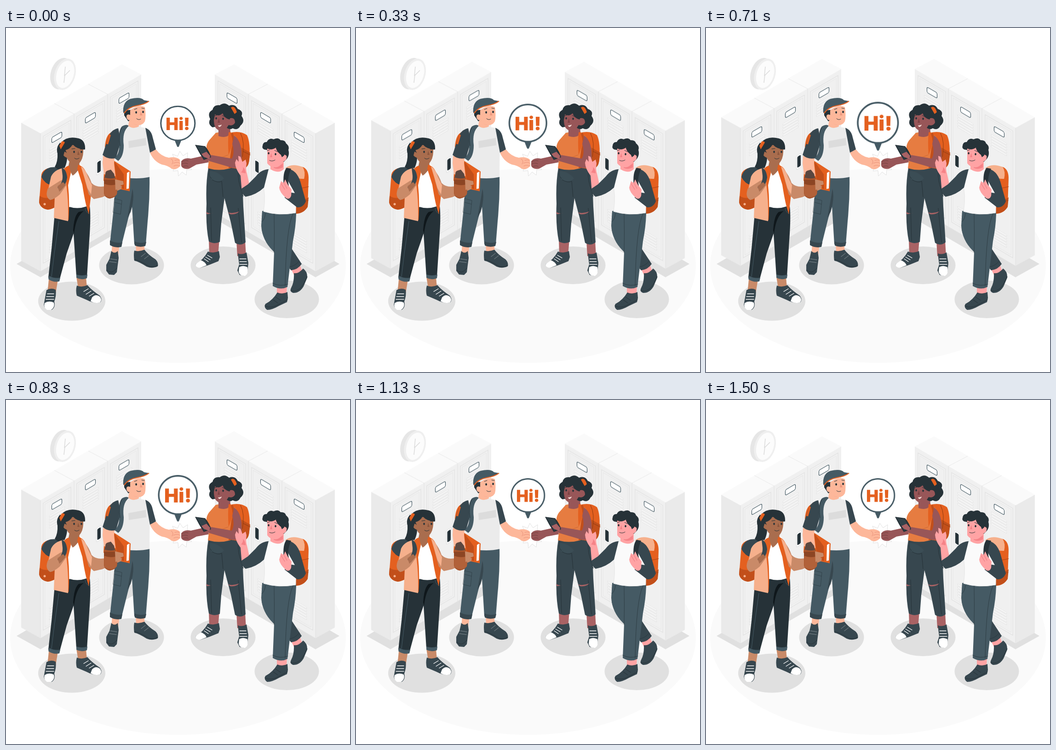
Animation of 748 by 748 pixels, one loop 1540 ms. Source, as an HTML page:

```html
<!DOCTYPE html>
<html lang="en">
<head>
<meta charset="utf-8">
<title>Hi!</title>
<style>
html, body { margin: 0; width: 100%; height: 100%; overflow: hidden; background: #fff; }
svg { display: block; width: 100vw; height: 100vh; }
.ink { fill: #263238; } .slate { fill: #455a64; } .deep { fill: #37474f; }
.orange { fill: #e4601f; } .rust { fill: #c24f1a; } .peach { fill: #f6b08c; }
.white { fill: #fff; } .shade { fill: #e0e0e0; }
.tan { fill: #a96d4e; } .tan2 { fill: #c98a68; } .fair { fill: #fdb79a; } .fair2 { fill: #ee987e; }
.brown { fill: #985658; } .brown2 { fill: #a96264; } .pink { fill: #ffa3a4; } .pink2 { fill: #f58388; }
.line { fill: none; stroke: #263238; stroke-width: 1; stroke-linecap: round; stroke-linejoin: round; }
.lace { fill: none; stroke: #fff; stroke-width: 1.3; stroke-linecap: round; }
.edge { fill: none; stroke: #e1e1e1; }
.lift { animation: lift 1540ms -15ms infinite; }
.bubble { transform-origin: 374px 214px; animation: beat 1540ms -15ms infinite; }
/* 37 poses per loop */
@keyframes lift {
  0% { transform: none; animation-timing-function: steps(18); }
  48.6486% { transform: translateY(-12.6px); animation-timing-function: steps(18); }
  97.2973%, 100% { transform: none; animation-timing-function: steps(1); }
}
@keyframes beat {
  0% { transform: scale(1.03); animation-timing-function: steps(3); }
  8.1081% { transform: scale(1.25); animation-timing-function: steps(1); }
  10.8108% { transform: scale(1.284); animation-timing-function: steps(7); }
  29.7297% { transform: scale(1); animation-timing-function: steps(1); }
  40.5405% { transform: scale(1.05); animation-timing-function: steps(3); }
  48.6486% { transform: scale(1.3); animation-timing-function: steps(4); }
  59.4595% { transform: scale(1.015); animation-timing-function: steps(1); }
  62.1622%, 100% { transform: scale(1); animation-timing-function: steps(1); }
}
</style>
</head>
<body>
<svg viewBox="0 0 748 748">
<defs>
  <g id="vent" fill="#fafafa" stroke="#e0e0e0" stroke-width=".8">
    <rect x="19" width="34" height="3.2" rx="1.5"/><rect x="19" y="6" width="34" height="3.2" rx="1.5"/>
    <rect x="19" y="12" width="34" height="3.2" rx="1.5"/><rect x="19" y="18" width="34" height="3.2" rx="1.5"/>
    <rect x="19" y="24" width="34" height="3.2" rx="1.5"/>
  </g>
  <g id="locker">
    <path class="edge" d="M0 0V300"/>
    <rect x="6" y="10" width="60" height="276" fill="#f2f2f2" stroke="#e3e3e3" stroke-width="1.5"/>
    <rect x="9.500" y="14" width="53" height="268" fill="#f0f0f0" stroke="#e6e6e6"/>
    <rect x="24.500" y="23.500" width="22" height="12" rx="3" fill="#fff" stroke="#455a64" stroke-width="1.200"/>
    <use href="#vent" y="45"/><use href="#vent" y="244"/>
    <rect x="48.500" y="132" width="11" height="30" rx="2" fill="#fff" stroke="#dedede"/>
    <rect x="50.500" y="135" width="7.500" height="24" rx="2" fill="#263238"/>
  </g>
  <g id="bank">
    <path fill="#fafafa" d="M33 206L252 79 294 101 75 229Z"/>
    <path fill="#eaeaea" d="M33 206L75 229V529L33 506Z"/>
    <path fill="#f0f0f0" d="M75 229L294 101V401L75 529Z"/>
    <path class="edge" d="M105 164L148 187M179 122L221 144" stroke-width=".7"/>
    <g transform="matrix(1 -.584 0 1 75 229)">
      <use href="#locker"/><use href="#locker" x="73"/><use href="#locker" x="146"/>
    </g>
  </g>
  <path id="pad" class="shade" d="M23 513L75 542 306 408 254 379Z"/>
</defs>

<ellipse cx="374" cy="517" rx="365" ry="211" fill="#fafafa"/>

<g transform="rotate(17 126 101)">
  <ellipse cx="120" cy="101" rx="23" ry="35" fill="#e6e6e6"/>
  <ellipse cx="128" cy="100" rx="22.500" ry="35" fill="#efefef"/>
  <ellipse cx="128.500" cy="100" rx="18.500" ry="30.500" fill="#fcfcfc"/>
</g>
<path d="M127 104L129 84M127 104L139 92M128 101L126 119" fill="none" stroke="#dadada" stroke-width="1.500"/>

<use href="#pad"/><use href="#pad" transform="matrix(-1 0 0 1 748 0)"/>
<g class="lift"><use href="#bank"/><use href="#bank" transform="matrix(-1 0 0 1 748 0)"/></g>

<g class="shade">
  <ellipse cx="143" cy="594" rx="73" ry="42.500"/><ellipse cx="273" cy="516" rx="70.500" ry="41.500"/>
  <ellipse cx="472" cy="516" rx="70.500" ry="41"/><ellipse cx="610.500" cy="590" rx="70" ry="41"/>
</g>

<path d="M366 285L362 274 373 279 378 268 385 278 395 271 394 284 405 287 397 297 404 308 393 308 392 320 383 313 375 322 374 310 363 311 369 300 360 294Z" fill="#fff" stroke="#e0e0e0"/>

<!-- boy in cap -->
<g>
  <path class="fair" d="M231 470H247L244 493H229ZM282 468H300L302 488 283 489Z"/>
  <path class="deep" d="M229 485Q236 492 243 485L245 500 243 515 241 531 235 537 224 536 218 528 218 515 225 502ZM279 484Q289 487 301 482 309 493 325 503 332 510 330 518 319 524 306 519 289 508 279 506 277 493 279 484Z"/>
  <path class="line" d="M219 526Q229 538 241 522M279 503Q292 506 309 517 319 522 330 516"/>
  <path class="lace" stroke-opacity=".25" d="M227 502L241 504M225 508L240 510M294 497L303 490M301 502L310 495"/>
  <path class="slate" d="M238 321H312Q313 370 308 420L304 470Q292 477 279 470L274 388 266 413 251 473Q238 479 226 468L235 385Z"/>
  <path class="deep" d="M226 462Q240 469 253 466L251 476Q237 479 226 472ZM279 464Q292 470 305 465L303 474Q291 478 280 473ZM275 350Q280 370 271 400L264 412Q272 370 275 350Z"/>
  <path class="line" stroke-opacity=".55" d="M236 371L252 375 249 405 233 401ZM236 379L251 383"/>
  <path class="orange" d="M215 258Q217 234 227 228L234 222 239 247 226 272Z"/>
  <path d="M240 221Q258 212 288 215 303 216 313 222L312 324Q282 331 240 322Z" fill="#ebebeb"/>
  <path d="M266 246L304 239 305 255 267 261Z" fill="#dcdcdc"/>
  <path class="orange" d="M234 288L271 312 269 355 241 349 212 332 213 312Z"/>
  <path class="rust" d="M235 289L256 318 257 350 243 347Z"/>
  <path class="white" d="M263 315L268.500 312 267 349 262 350Z"/>
  <path class="fair" d="M211 278L236 282 235 294 238 322 213 318 210 294Z"/>
  <path class="deep" d="M244 218Q227 221 221 242L210 276Q222 287 239 283L250 246ZM303 217Q316 222 319 238L326 264Q318 271 313 271Z"/>
  <path class="orange" d="M218 252L225 231 228 233 222 253Z"/>
  <path class="slate" d="M252 214Q263 208 267 213 252 225 256 255 256 279 244 289L236 283Q248 273 246 248 244 224 252 214Z"/>
  <path class="line" d="M252 216Q243 231 248 256"/>
  <path class="fair" d="M313 271L326 264Q337 279 354 282 369 279 378 286L379 300Q370 310 360 306 352 299 339 297 321 290 313 271Z"/>
  <path class="line" style="stroke:#e9927a" d="M367 288Q376 285 377 289M364 294Q373 290 378 294M365 300Q372 297 377 300M359 285Q366 288 361 296"/>
  <path class="fair" d="M268 197L266 213Q277 221 289 214L288 207Z"/>
  <path class="fair2" d="M274 205Q281 212 289 211L288 206Z"/>
  <path class="ink" d="M257 179L273 178 272 198 266 203 257 190Z"/>
  <path class="fair" d="M270 179Q288 165 302 172 305 191 302 203 296 213 285 211 273 208 270 201 261 200 262 191 264 186 270 189Z"/>
  <path class="slate" d="M255 184Q253 160 271 154 293 149 300 157L311 159Q304 166 284 169 266 173 257 185Z"/>
  <path d="M257 185Q266 172 284 169 302 166 311 159" fill="none" stroke="#e4601f" stroke-width="2.200"/>
  <path class="ink" d="M283 181a1.900 2.500 0 1 0 .1 0M298 180a1.900 2.500 0 1 0 .1 0"/>
  <path class="line" stroke-width="1.500" d="M279 177L285 175M295 174L301 175M284 197Q288 201 293 198"/>
  <path class="fair2" d="M293 182L297 190 291 190Z"/>
</g>

<!-- girl with bottle -->
<g>
  <path class="orange" d="M77 318Q79 309 91 305L122 313 116 384Q104 393 92 395 75 393 72 379Z"/>
  <path class="rust" d="M73 365Q90 376 117 362L115 384Q102 394 90 395 75 392 72 379Z"/>
  <path class="deep" d="M77 324Q81 307 97 303 113 301 126 307L116 331Q105 333 98 342 84 338 77 324Z"/>
  <circle cx="84" cy="383" r="2.500" class="peach"/>
  <path class="tan2" d="M93 547H113L108 577H90ZM153 541H174L176 566H157Z"/>
  <path class="deep" d="M88 570Q98 564 108 569 110 581 105 595 108 608 99 613H90Q80 607 83 597ZM154 560Q165 565 177 559 186 570 204 582 211 592 204 597 192 600 175 591L154 582Q151 571 154 560Z"/>
  <path class="white" d="M84 598Q93 592 104 597 107 607 98 613H89Q81 608 84 598ZM187 586Q195 577 204 584 210 591 204 597 194 600 184 594Z"/>
  <path class="lace" d="M90 578H104M88 584H104M87 590H104M169 573L179 567M174 579L185 572M181 583L191 577"/>
  <path class="ink" d="M108 398Q132 386 182 387 185 410 181 462L176 541Q165 547 153 540L147 447 132 490 116 549Q103 552 92 543Q100 478 105 414Z"/>
  <path class="slate" d="M94 539Q104 545 118 543L116 551Q103 554 92 546ZM153 536Q165 540 177 536L176 544Q164 549 153 543Z"/>
  <path class="line" style="stroke:#455a64" d="M115 420L105 490 99 540M172 391Q173 401 181 404"/>
  <path d="M169 398Q152 410 148 447L146 440Q148 408 158 400Z" fill="#0f171b"/>
  <path class="ink" d="M118 249Q108 259 112 273 113 290 106 302L121 314Q134 298 133 276Z"/>
  <path class="white" d="M135 302L164 297 175 388Q155 395 135 388Z"/>
  <path class="tan" d="M139 285H159L160 304Q153 316 145 321L135 304Z"/>
  <path class="orange" d="M137 299Q126 302 125 312L126 413 136 418Q139 377 135 342L141 315ZM157 297Q172 302 176 321L185 362 180 405Q172 382 166 341L155 306Z"/>
  <path class="tan2" d="M169 307Q181 321 186 337 198 349 219 343L239 330 255 334 256 340 248 343 251 350 235 357 209 368 191 372 180 362 172 333Z"/>
  <path class="peach" d="M163 301Q173 307 178 324L187 342 185 362 177 348Z"/>
  <path class="peach" d="M126 304Q105 308 98 323L92 350Q89 361 98 368L106 366 104 413 135 420Q136 380 132 347Z"/>
  <path class="tan2" d="M91 349Q102 342 118 332L128 329 131 342 117 362Q104 373 96 374 84 367 91 349Z"/>
  <path class="deep" d="M121 304Q131 306 133 325 131 341 119 353L112 347Q124 337 123 321Z"/>
  <path class="tan" d="M112 344L124 335 130 341 116 356Z"/>
  <path class="ink" d="M120 249Q133 234 158 240 173 244 172 264L163 265 126 285 120 274Z"/>
  <path class="tan" d="M128 262Q145 247 168 261 169 279 163 289 158 298 150 297 137 294 132 282 122 278 124 270 128 267 132 272Z"/>
  <path class="ink" d="M120 251Q134 238 152 241 169 242 172 264 154 264 145 253 139 264 128 266L124 281 118 266Z"/>
  <path class="orange" d="M121 247Q126 245 128 249L119 264 116 256Z"/>
  <path class="ink" d="M148 267a1.800 2.400 0 1 0 .1 0M164 267a1.800 2.400 0 1 0 .1 0"/>
  <path class="line" stroke-width="1.400" d="M143 263L150 262M161 263L167 264M149 283Q153 287 159 283"/>
  <path d="M157 267L160 276 155 276Z" fill="#8d573d"/>
  <path d="M213 325Q226 317 239 325L242 358Q239 369 226 371 214 369 213 360Z" fill="#a9552c"/>
  <path d="M213 330L240 330 240 341Q227 344 213 340Z" fill="#8c4524"/>
  <path d="M214 339Q227 344 241 340L241 362Q228 373 214 363Z" fill="#b26139"/>
  <path d="M216 318Q216 311 221 310L228 308 235 317 237 326Q226 329 214 325Z" fill="#5a4740"/>
  <path class="tan2" d="M237 329L255 333 255 338 243 341 252 344 251 349 238 352Z"/>
</g>

<!-- woman with phone -->
<g>
  <path class="brown2" d="M441 459H464L461 495 442 493ZM501 463H520L522 496H503Z"/>
  <path class="deep" d="M439 486Q451 491 463 485L465 498 462 507 442 515 421 522Q411 519 413 513 429 504 439 486ZM504 490Q513 494 523 488L527 511 525 531 518 539 508 537 503 527 507 514Z"/>
  <path class="white" d="M424 505Q434 509 436 516L421 522Q409 519 414 512ZM507 520Q515 515 525 520 528 534 520 539 508 540 506 530Z"/>
  <path class="lace" d="M434 498L444 504M438 494L448 500M431 502L440 508M508 502H522M508 508H523M508 514H524"/>
  <path class="deep" d="M440 304H508Q515 340 516 388L521 466Q510 475 498 467L489 423 475 370 468 425 465 465Q453 471 441 464 434 430 436 382 434 338 440 304Z"/>
  <path class="slate" d="M440 311Q460 310 474 327 466 337 448 331 440 325 440 311Z" opacity=".3"/>
  <path class="line" d="M443 307Q440 326 447 327M448 330Q462 338 469 333L472 367M506 309Q501 326 516 366M445 391L447 463M505 392L512 466"/>
  <path class="brown2" d="M435 400Q443 405 451 402L437 405ZM482 401Q494 404 507 399 501 406 488 405Z"/>
  <path class="orange" d="M487 228Q509 222 524 233 532 249 529 287 527 306 511 307L488 304Z"/>
  <path class="rust" d="M512 260L531 271 528 292Q526 305 511 307Z"/>
  <path class="line" style="stroke:#8e3b12" d="M510 229Q520 248 514 280M515 268L531 276"/>
  <path class="brown" d="M381 290Q387 281 402 284L438 276 441 292 414 297 398 306Q385 308 381 300Z"/>
  <path class="line" style="stroke:#71403f" d="M382 291Q390 287 396 289M381 296Q389 292 395 295M384 302Q391 298 396 301"/>
  <path d="M456 228Q481 222 500 236 501 253 491 267L488 305Q463 312 439 305L442 279Q430 261 441 245Z" fill="#e67c41"/>
  <path class="brown" d="M462 211H487L488 228Q482 241 462 235Z"/>
  <path d="M438 279Q456 289 483 276" fill="none" stroke="#cf6a31"/>
  <path class="orange" d="M488 226Q499 240 489 263L484 276Q482 246 484 227Z"/>
  <path class="rust" d="M493 228Q502 246 494 277L490 304 484 305 490 263Q496 248 489 230Z"/>
  <path class="brown" d="M496 234Q509 242 512 267L513 295Q509 306 492 304L441 289 430 280Q424 269 434 268L445 276 491 284Q498 271 492 252Z"/>
  <path class="ink" d="M411 254L433 257Q443 269 446 281L430 287Q420 272 411 254Z"/>
  <path class="slate" d="M414 256L432 259 442 279 431 284Z" opacity=".4"/>
  <path class="brown2" d="M425 274L436 269 444 278 442 285 430 280Z"/>
  <path class="ink" d="M449 216Q438 209 444 198 437 184 449 178 452 166 465 168 475 160 485 169 498 164 504 176 517 181 512 191 521 203 510 212 504 224 493 218 484 224 475 211Z"/>
  <path class="brown" d="M455 185Q461 192 472 185 478 199 488 196 498 194 498 206 493 214 484 211 477 225 462 222 452 218 452 200Z"/>
  <path class="ink" d="M453 187Q448 175 466 174 482 171 491 189L486 199Q474 196 471 185 463 194 453 187Z"/>
  <path class="orange" d="M489 173Q497 167 502 183L497 187Z"/>
  <path class="ink" d="M457 194a1.800 2.400 0 1 0 .1 0M472 195a1.800 2.400 0 1 0 .1 0"/>
  <path class="line" stroke-width="1.400" d="M454 191L459 189M470 190L476 193"/>
  <path d="M461 212Q465 212 469 210 468 215 463 215Z" fill="#f5dcd8"/>
  <path d="M463 196L460 206 465 206Z" fill="#7d4345"/>
</g>

<!-- boy waving -->
<g>
  <path class="peach" d="M607 305Q620 293 645 302 657 307 657 327L656 380 621 390Z"/>
  <path class="orange" d="M624 324Q645 331 658 326L656 386Q649 403 631 404L620 394ZM645 302Q658 307 658 327L648 329Q652 312 645 302Z"/>
  <path class="rust" d="M632 372Q651 375 658 368L656 389Q647 404 630 403Z"/>
  <path class="line" style="stroke:#a84214" d="M635 350L658 345M636 378L657 375"/>
  <path class="pink" d="M589 558H611L610 580H589ZM618 520L638 512 645 531 628 541Z"/>
  <path class="deep" d="M590 575Q601 580 612 574L613 587 611 596 594 604Q579 613 568 613 560 608 564 600 580 592 590 575ZM626 533Q636 535 646 523 656 530 655 543L647 562Q638 577 624 576 616 573 620 565 627 552 626 533Z"/>
  <path class="line" d="M563 604Q575 612 595 600L612 591M619 571Q637 576 648 554L655 541M581 591L591 598M586 585L597 592"/>
  <path class="deep" d="M557 400H594L604 457 622 481 643 513Q635 525 620 527L585 484Q560 463 556 438Z"/>
  <path class="slate" d="M557 398Q592 390 631 399 631 428 624 463L612 563Q597 571 580 561L583 487Q557 463 555 430Z"/>
  <path class="line" stroke-opacity=".7" d="M583 404Q584 446 583 488M564 403Q563 415 557 421M624 404Q609 434 607 561M580 555Q596 563 613 557M617 519Q629 518 638 506"/>
  <path d="M565 309Q588 302 615 307L631 342 630 402Q593 409 560 399Q566 361 557 334Z" fill="#fafafa" stroke="#e4e4e4"/>
  <path class="pink" d="M513 357L510 321Q499 307 498 293L501 285 506 291 505 278 510 280 514 291 521 286 523 294Q521 308 524 316L530 344Z"/>
  <path class="pink2" d="M511 314Q517 308 515 302 521 307 521 316Z"/>
  <path class="deep" d="M571 307Q554 308 543 323L526 340 511 350Q513 362 521 367 544 363 561 347Z"/>
  <path class="pink" d="M575 288H604V307Q593 318 575 307Z"/>
  <path class="pink2" d="M582 299Q593 303 602 294V303Q592 309 582 304Z"/>
  <path class="deep" d="M613 306Q632 309 640 334L652 377Q646 391 633 390L606 369 609 356 628 359 613 332Z"/>
  <path class="ink" d="M610 304Q601 315 604 343L610 355 617 350Q609 329 620 306Z"/>
  <path class="pink" d="M596 340L598 333 604 337 607 329 613 341 621 351 620 365Q616 375 608 369 595 357 594 347Z"/>
  <path class="line" style="stroke:#e9757c" d="M598 338L606 351M604 336L611 349"/>
  <path class="ink" d="M567 265Q555 264 558 256 559 247 567 248 572 238 582 242 592 237 597 244 607 243 609 251 617 257 614 265 617 276 611 284L604 291 590 283Z"/>
  <path class="pink" d="M568 262Q579 267 588 259 590 272 600 277 605 273 610 278 612 287 602 291 596 302 587 303 574 303 568 294 566 280Z"/>
  <path class="ink" d="M586 257Q596 256 604 264L605 277 600 281 597 274Q588 270 586 257Z"/>
  <path class="ink" d="M571 270a1.800 2.400 0 1 0 .1 0M586 272a1.800 2.400 0 1 0 .1 0"/>
  <path class="line" stroke-width="1.500" d="M568 267L573 265M584 266L590 269M573 288Q579 291 585 287"/>
  <path class="pink2" d="M577 272L574 281 579 281Z"/>
</g>

<g class="bubble">
  <path class="slate" d="M366 241H382L376 256Q374 259 372 256Z"/>
  <circle cx="373.800" cy="207.500" r="36" fill="#fff" stroke="#455a64" stroke-width="3"/>
  <text x="373.800" y="221.500" text-anchor="middle" font-family="Inter, 'Open Sans', sans-serif" font-weight="900" font-size="36" fill="#e4601f">Hi!</text>
</g>
</svg>
</body>
</html>
```
